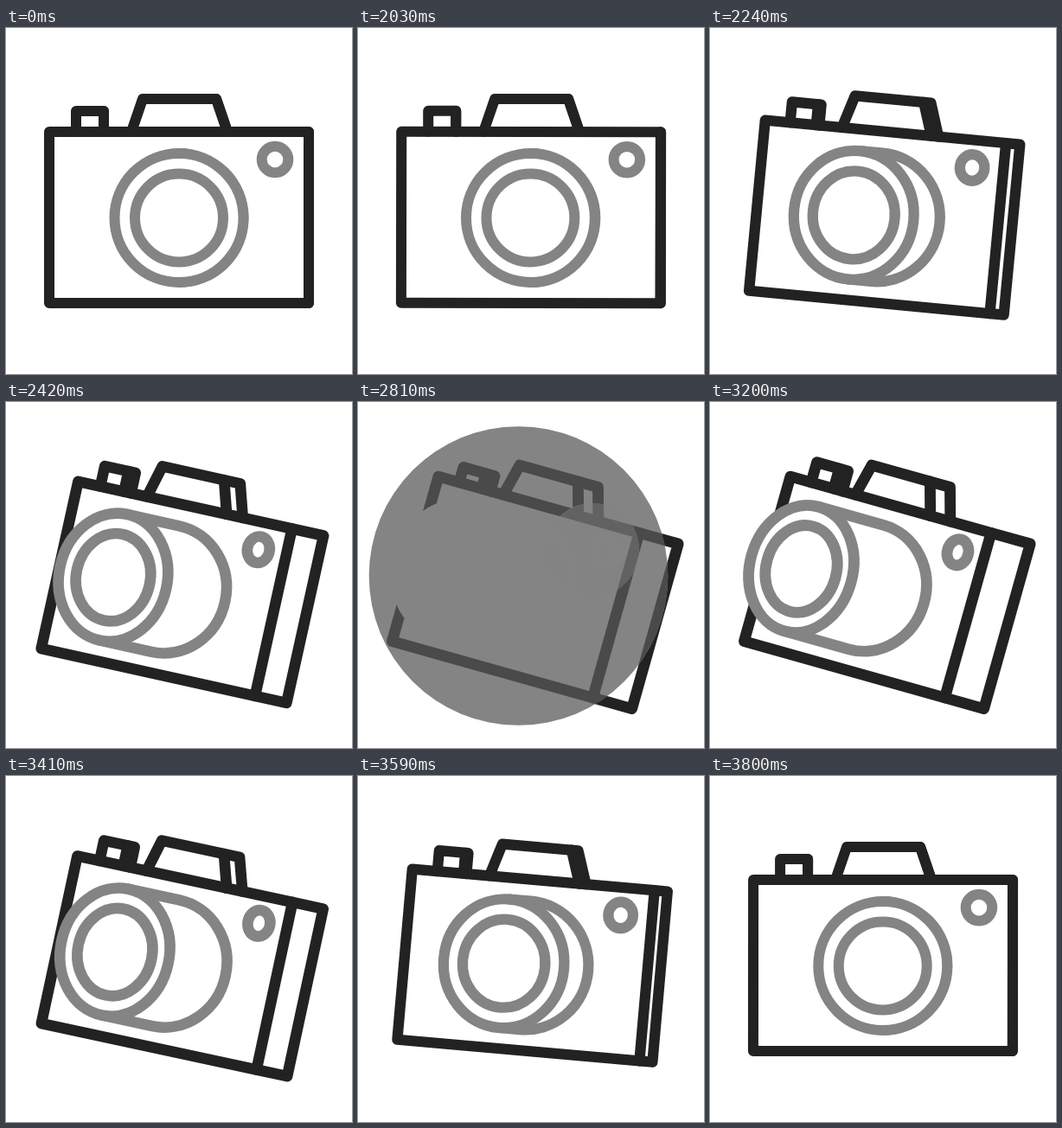
An HTML page with a canvas for the animation above (3830 ms loop, 400 by 400 pixels).

```html
<!DOCTYPE html>
<html>
<head>
<meta charset="utf-8">
<title>Camera</title>
<style>
  html, body { margin: 0; height: 100%; overflow: hidden; background: #fff; }
  canvas { display: block; width: 100vw; height: 100vh; }
</style>
</head>
<body>
<canvas id="stage" width="400" height="400"></canvas>
<script>
const ctx = document.getElementById('stage').getContext('2d');
const LOOP = 3830, START = 2030, STEP = 30;
const DARK = '#222', GREY = '#848484';
const TILT = 15.7 * Math.PI / 180;

const clamp = x => Math.min(1, Math.max(0, x));
const ease = x => (1 - Math.cos(Math.PI * clamp(x))) / 2;

function line(points, color, closed) {
  ctx.beginPath();
  points.forEach(([x, y]) => ctx.lineTo(x, y));
  if (closed) ctx.closePath();
  ctx.strokeStyle = color;
  ctx.stroke();
}

function ellipse(x, y, r, squash, fill) {
  ctx.beginPath();
  ctx.ellipse(x, y, r * squash, r, 0, 0, 2 * Math.PI);
  paint(fill);
}

function paint(fill) {
  ctx.fillStyle = fill;
  ctx.fill();
  ctx.strokeStyle = GREY;
  ctx.stroke();
}

// turn: 0 = front view, 1 = fully turned; press: how far the button is down
function camera(turn, press, dark, fill) {
  const mix = (a, b) => a + (b - a) * turn;
  const squash = mix(1, 0.8);
  ctx.save();
  ctx.translate(200, 219);
  ctx.rotate(TILT * turn);
  ctx.lineWidth = mix(12, 12.8);
  ctx.lineJoin = ctx.lineCap = 'round';

  // shutter button
  const top = -123 + press, left = mix(-119, -114), back = mix(-87, -76.5);
  line([[left, -99], [left, top], [back, top], [back, -99]], dark);
  line([[-87, top], [-87, -99]], dark);

  // viewfinder
  line([[mix(-55, -61), -99], [mix(-42, -52), -137], [mix(43, 42), -137], [mix(56, 53), -99]], dark);
  line([[mix(43, 18), -137], [mix(56, 29), -99]], dark);

  // body: front face and side
  const l = mix(-150, -139), r = mix(150, 102), side = mix(150, 149);
  line([[l, -99], [r, -99], [r, 99], [l, 99]], dark, true);
  line([[r, -99], [side, -99], [side, 99], [r, 99]], dark);

  // lens barrel and rings
  const rear = mix(0, -20), front = mix(0, -98), y = 0.5, R = 74.5;
  ctx.beginPath();
  ctx.moveTo(front, y - R);
  ctx.ellipse(rear, y, R * mix(1, 0.93), R, 0, -Math.PI / 2, Math.PI / 2);
  ctx.lineTo(front, y + R);
  paint(fill);
  ellipse(front, y, R, squash, fill);
  ellipse(front, y, 51, squash, fill);

  // flash lamp
  ellipse(mix(111, 71), -67, 15.3, squash, fill);
  ctx.restore();
}

// redraws the camera inside a disc of light
function glow(x, y, r, turn, press, dark, fill) {
  ctx.save();
  ctx.beginPath();
  ctx.arc(x, y, r, 0, 2 * Math.PI);
  ctx.clip();
  ctx.fillStyle = fill;
  ctx.fillRect(0, 0, 400, 400);
  camera(turn, press, dark, fill);
  ctx.restore();
}

function draw(now) {
  let t = now % LOOP;
  t = t < START ? 0 : START + Math.floor((t - START) / STEP) * STEP;

  const turn = ease((t - 2000) / 600) - ease((t - 3220) / 600);
  const press = 6 * (ease((t - 2600) / 200) - ease((t - 2800) / 200));

  ctx.fillStyle = '#fff';
  ctx.fillRect(0, 0, 400, 400);
  camera(turn, press, DARK, '#fff');
  if (t >= 2800 && t < 3040) {
    glow(185.5, 201, 172.8, turn, press, '#4a4a4a', GREY);
    glow(271, 171, 54, turn, press, '#626262', '#838383');
  }
  requestAnimationFrame(draw);
}
requestAnimationFrame(draw);
</script>
</body>
</html>
```
